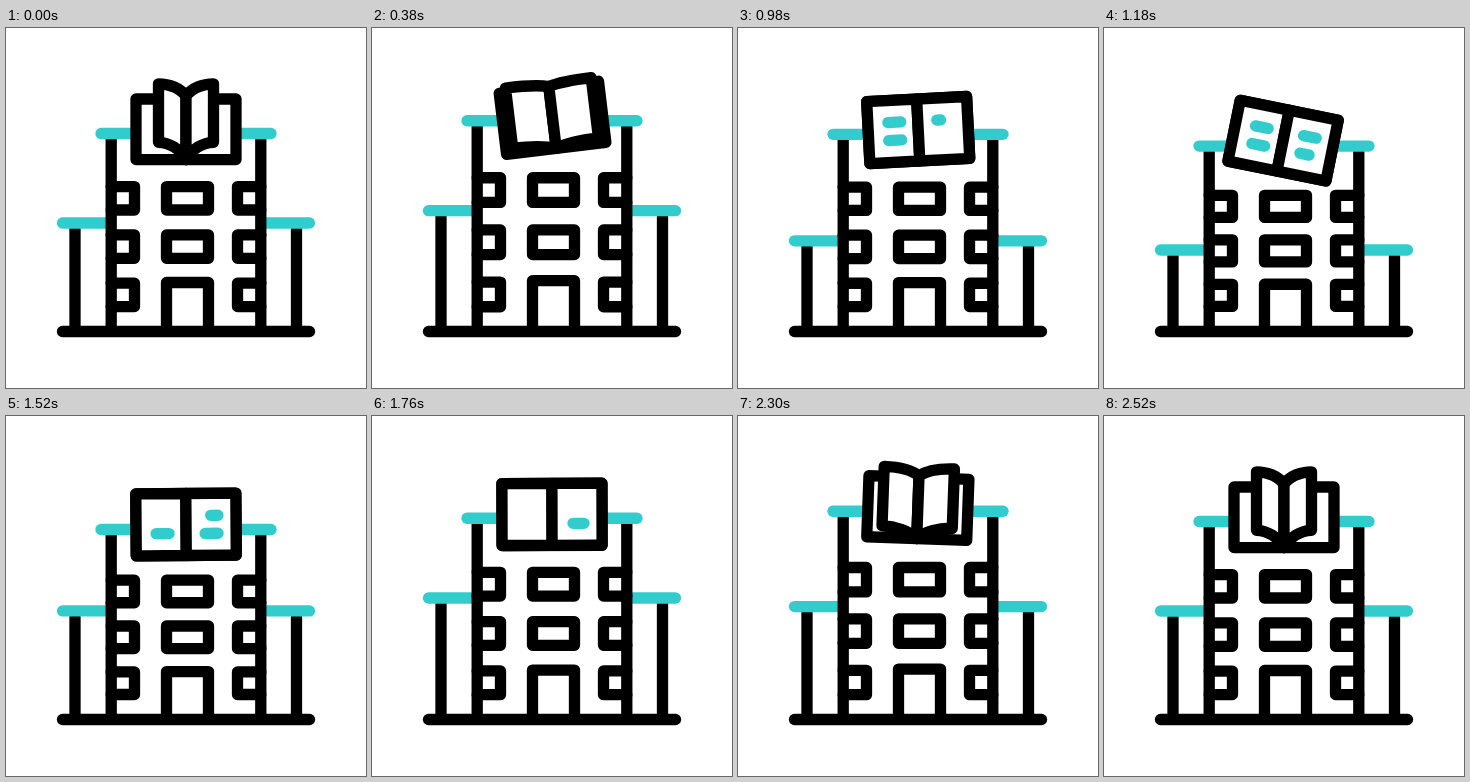
These frames come from a looping animation (360 px wide and 360 px high, 3020 ms). An HTML page with a canvas:

```html
<!DOCTYPE html>
<html lang="en">
<head>
<meta charset="utf-8">
<title>Library</title>
<style>
  html, body { margin: 0; height: 100%; overflow: hidden; background: #fff; }
  canvas { display: block; }
</style>
</head>
<body>
<canvas id="stage" width="360" height="360"></canvas>
<script>
const ctx = document.getElementById('stage').getContext('2d');
const LOOP = 3020, ACTIVE = 2520;
const BLACK = '#000', TEAL = '#33cccc';
const ROOF = 105.5, WING = 195;

const mix = (a, b, p) => a + (b - a) * p;
const ramp = (t, from, to) => Math.max(0, Math.min(1, (t - from) / (to - from)));
const ease = (t, from, to) => {
  const s = ramp(t, from, to);
  return s * s * (3 - 2 * s);
};

// Adds up eased moves, each given as [from, to, change]
const sway = (t, start, ...moves) =>
  moves.reduce((sum, [from, to, change]) => sum + change * ease(t, from, to), start);

const roofAt = t => sway(t, ROOF, [0, 520, -15.5], [660, 1260, 29.5], [1260, 2160, -29.5], [2160, ACTIVE, 15.5]);
const wingAt = t => sway(t, WING, [0, 520, -15], [520, 1180, 42], [1180, 1730, -40], [1960, ACTIVE, 13]);
const tiltAt = t => sway(t, 0, [160, 720, -20], [720, 1220, 32], [1220, 1600, -14], [1600, 2060, 6.5], [2060, ACTIVE, -4.5]);
const flatAt = t => ease(t, 0, 600) - ease(t, 1960, ACTIVE);

function stroke(d, color = BLACK, fill) {
  const path = new Path2D(d);
  if (fill) {
    ctx.fillStyle = fill;
    ctx.fill(path);
  }
  ctx.strokeStyle = color;
  ctx.stroke(path);
}

function drawBuilding(roof, wing) {
  const shift = roof - ROOF;
  stroke(`M69 ${wing + 6}V303M290.5 ${wing + 6}V303`);
  stroke(`M56.5 ${wing}H104M256 ${wing}H303.5`, TEAL);
  stroke(`M105.2 ${roof + 6}V303M254.8 ${roof + 6}V303`);
  stroke(`M95 ${roof}H265`, TEAL);

  // Higher floors follow the roof more closely
  const height = 23.4 - .1 * shift;
  for (let floor = 0; floor < 3; floor++) {
    const y = 170.3 + 48.3 * floor;
    const top = y + shift * (273 - y) / 160 - height / 2;
    stroke(`M105.2 ${top}h23.3v${height}h-23.3M254.8 ${top}h-23.3v${height}h23.3`);
    if (floor < 2) stroke(`M160.5 ${top}h42v${height}h-42z`);
  }
  stroke(`M160.5 303V${254.5 + .14 * shift}H202.5V303`);
  stroke('M56.5 303.5H303.5');
}

function drawPage(side, flat, half) {
  const x = v => side * v;
  const edge = mix(27.5, 50, flat);
  const top = mix(-45.5, -half, flat), bottom = mix(13, half, flat);
  const spineTop = mix(-33, -half, flat);
  stroke(`M0 ${spineTop}
    C${x(edge * .2)} ${mix(spineTop, top, .65)} ${x(edge * .6)} ${top} ${x(edge)} ${top}
    V${bottom}
    C${x(edge * .62)} ${bottom} ${x(edge * .2)} ${mix(bottom, half, .4)} 0 ${half}z`,
    BLACK, '#fff');
}

function drawTextLines(t) {
  const length = 13, step = 140;
  for (let col = 0; col < 2; col++) {
    for (let row = 0; row < 2; row++) {
      const x = -30 + 49 * col, y = -9 + 18 * row;
      const drawn = 660 + step * (2 * col + row), erased = 1320 + step * (2 * row + col);
      const start = ramp(t, erased, erased + step), end = ramp(t, drawn, drawn + step);
      if (end > start) stroke(`M${x + start * length} ${y}H${x + end * length}`, TEAL);
    }
  }
}

function drawBook(t, roof) {
  const tilt = tiltAt(t), flat = flatAt(t), half = mix(30.3, 31, flat);
  ctx.save();
  ctx.translate(180 - tilt * .08, roof - 4.2 - .1 * (roof - ROOF));
  ctx.rotate(tilt * Math.PI / 180);
  stroke(`M-50 ${-half}H50V${half}H-50z`, BLACK, '#fff');
  drawPage(-1, flat, half);
  drawPage(1, flat, half);
  drawTextLines(t);
  ctx.restore();
}

function draw(now) {
  const t = Math.min(now % LOOP, ACTIVE);
  const roof = roofAt(t);
  ctx.fillStyle = '#fff';
  ctx.fillRect(0, 0, 360, 360);
  ctx.lineWidth = 11.3;
  ctx.lineCap = ctx.lineJoin = 'round';
  drawBuilding(roof, wingAt(t));
  drawBook(t, roof);
  requestAnimationFrame(draw);
}

requestAnimationFrame(draw);
</script>
</body>
</html>
```
